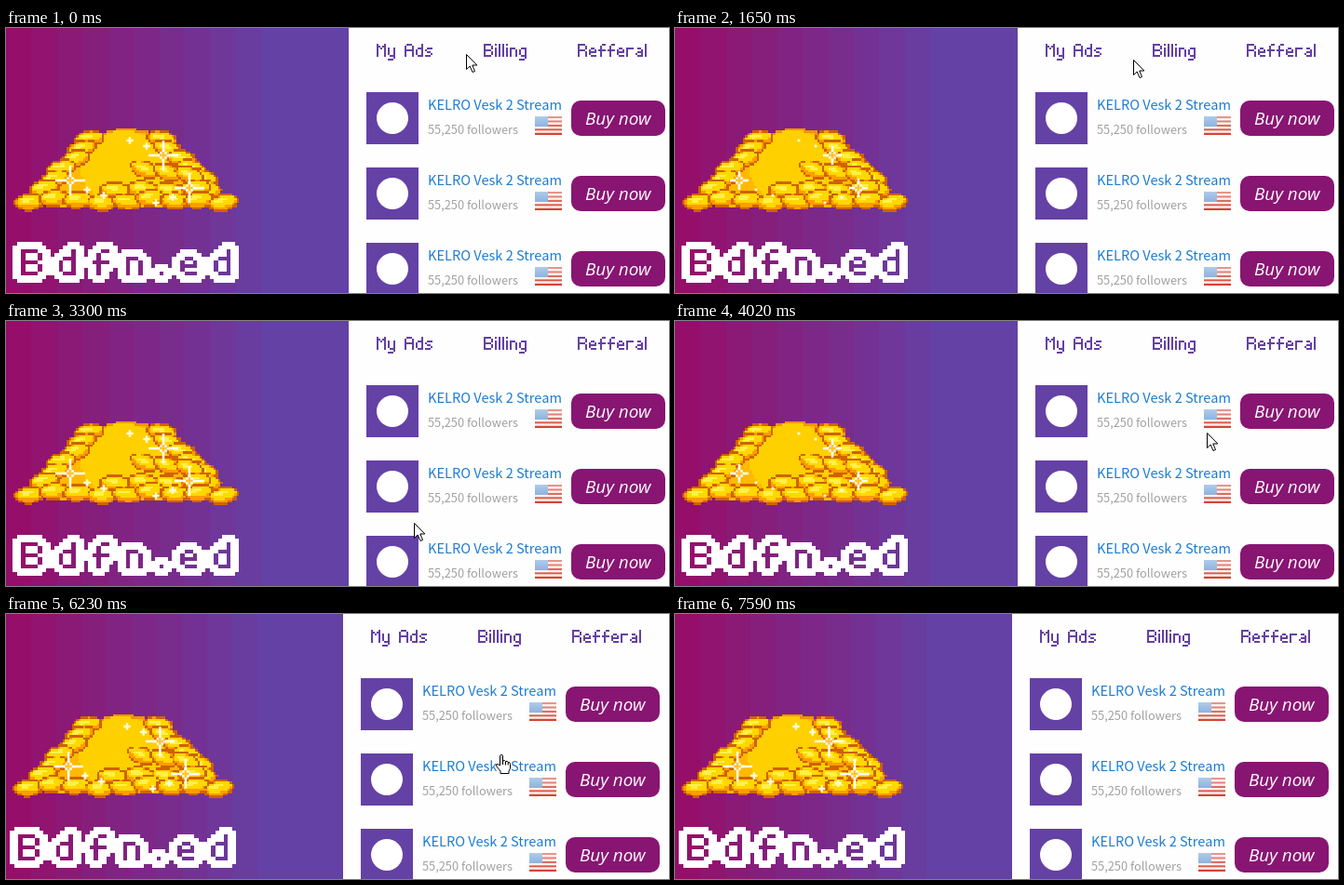
Write an HTML page with a canvas that moves like this. It is 712 px wide and 285 px high and loops after 7.69 s.

```html
<!DOCTYPE html>
<html lang="en">
<head>
<meta charset="utf-8">
<title>Stream ads</title>
<style>
  html, body { margin: 0; width: 100%; height: 100%; overflow: hidden; background: #fff; }
  canvas { display: block; }
</style>
</head>
<body>
<canvas id="stage" width="712" height="285" aria-label="Stream advertising page"></canvas>
<script>
const ctx = document.getElementById('stage').getContext('2d');
const LOOP = 7690, PURPLE = '#6441a5';
const SANS = '"Noto Sans CJK JP", "Noto Sans CJK SC", "Open Sans", sans-serif';

// Letters are built from shared strokes; each pair of digits is a column and a row.
const stem = '00 06', short = '02 06', bowl = '32 12 03 05 16 36';
const tail = '32 37 28 08', cap = '00 30 41 42 33 03';
const glyphs = {
  M: [stem, '00 22 40 46'],
  A: [stem.replace('00', '01'), '01 10 30 41 46', '03 43'],
  B: [stem, cap, '33 44 45 36 06'],
  R: [stem, cap, '33 44 46'],
  a: ['12 22 33 36 16 05 14 34'],
  d: ['30 36', bowl],
  e: ['34 04 05 16 36', '04 03 12 22 33 34'],
  f: ['16 11 20 30', '03 33'],
  g: [bowl, tail],
  i: ['00 00', short],
  l: [stem],
  n: [short, '03 12 22 33 36'],
  r: [short, '03 12 32'],
  s: ['32 12 03 14 24 35 26 06'],
  y: ['02 05 16 36', tail],
  '.': ['06 06']
};

function cellsOf(text, gap) {
  const cells = [];
  let left = 0;
  for (const ch of text) {
    if (ch === ' ') { left += 4; continue; }
    let width = 0;
    for (const stroke of glyphs[ch]) {
      const pts = stroke.split(' ').map(p => [+p[0], +p[1]]);
      for (let i = 1; i < pts.length; i++) {
        const [x, y] = pts[i - 1], dx = pts[i][0] - x, dy = pts[i][1] - y;
        const n = Math.max(Math.abs(dx), Math.abs(dy), 1);
        for (let k = 0; k <= n; k++) {
          const cx = Math.round(x + dx * k / n);
          cells.push([left + cx, Math.round(y + dy * k / n)]);
          width = Math.max(width, cx + 1);
        }
      }
    }
    left += width + gap;
  }
  return cells;
}

const nav = [['My Ads', 398], ['Billing', 513], ['Refferal', 614]]
  .map(([text, x]) => [cellsOf(text, 1), x]);
const logo = cellsOf('Bdfn.ed', 4);

let seed = 7;
const jitter = size => {
  seed = seed * 16807 % 2147483647;
  return (seed / 2147483647 * 2 - 1) * size;
};

// Gold pile, built once on a coarse grid.
const CELL = 2.5;
const pile = document.createElement('canvas');
pile.width = 102;
pile.height = 80;
const gold = pile.getContext('2d');

function disc(cx, cy, rx, ry, turn, color, floor = 198) {
  const c = Math.cos(turn), s = Math.sin(turn);
  gold.fillStyle = color;
  for (let j = 40; j < 80; j++) for (let i = 0; i < 102; i++) {
    const x = (i + .5) * CELL - cx, y = (j + .5) * CELL - cy;
    const u = (x * c + y * s) / rx, v = (y * c - x * s) / ry;
    if (u * u + v * v <= 1 && y + cy < floor) gold.fillRect(i, j, 1, 1);
  }
}

function coin(x, y, turn) {
  disc(x, y, 16.5, 9.5, turn, '#cf6200');
  disc(x, y, 14.5, 7.5, turn, '#ff9c00');
  disc(x, y - 1.5, 13.5, 5.5, turn, '#ffd800');
  disc(x - 3, y - 2.5, 7, 2, turn, '#fff04a');
}

disc(129, 193, 82, 85, 0, '#f09400', 193);
disc(129, 193, 79, 82, 0, '#ffb900', 193);
disc(126, 150, 46, 40, 0, '#ffd000', 193);
for (const side of [-1, 1]) {
  for (let i = 5; i >= 0; i--) {
    const k = i / 5;
    coin(129 + side * (90 - 55 * k) + jitter(5), 172 - 53 * k, side * .25 + jitter(.1));
  }
}
for (let i = 0; i < 3; i++) coin(149 + 24 * i, 152 + 3 * i, .35);
for (let i = 0; i < 4; i++) coin(117 + 29 * i, 172 + jitter(3), jitter(.2));
for (let i = 0; i < 9; i++) coin(25 + 26 * i, 185 + jitter(3), jitter(.2));

// Each star throws two small glints to one side.
const stars = [[69, 164, 1, 1], [169, 137, -1, -1], [197, 172, -1, 1]];

function drawSparkles(beat) {
  const k = beat % 17;
  const r = k < 8 ? 16 : 10 + 6 * Math.abs(Math.cos(Math.PI * (k - 7) / 10));
  const dot = (x, y, w = CELL, h = CELL) => ctx.fillRect(x - w / 2, y - h / 2, w, h);
  for (const [x, y, sx, sy] of stars) {
    ctx.fillStyle = '#fff';
    dot(x, y, CELL, 2 * r);
    dot(x, y, 2 * r, CELL);
    for (let i = -2; i <= 2; i++) for (let j = -2; j <= 2; j++) {
      const d = Math.abs(i) + Math.abs(j);
      ctx.fillStyle = d < 2 ? '#ffc020' : '#fff';
      if (d < 3) dot(x + i * CELL, y + j * CELL);
    }
    ctx.fillStyle = '#fffbd0';
    for (const n of [1, 2]) {
      const size = (k + n) % 17 > 11 ? CELL : 3 * CELL;
      dot(x + sx * 18 * n, y + sy * (4 + 6 * n), size);
      dot(x + sx * 18 * n, y + sy * (4 + 6 * n), CELL, size);
    }
  }
}

// Panel colour: equal purple bands with hard edges.
function bands(width) {
  const count = 11, g = ctx.createLinearGradient(0, 0, width * .82, 0);
  for (let i = 0; i < count; i++) {
    const mix = (a, b) => Math.round(a + (b - a) * i / (count - 1));
    const color = `rgb(${mix(149, 100)},${mix(15, 65)},${mix(106, 165)})`;
    g.addColorStop(i / count, color);
    g.addColorStop((i + 1) / count, color);
  }
  return g;
}

function drawLogo(x0, y0, fill) {
  const w = 4.5, h = 4;
  const block = (x, y, cw, ch) => {
    const l = Math.round(x0 + x * w), t = Math.round(y0 + y * h);
    ctx.fillRect(l, t, Math.round(x0 + (x + cw) * w) - l, Math.round(y0 + (y + ch) * h) - t);
  };
  ctx.fillStyle = '#fff';
  for (const [x, y] of logo) {
    block(x - 2, y - 1, 5, 3);
    block(x - 1, y - 2, 3, 5);
  }
  ctx.fillStyle = fill;
  for (const [x, y] of logo) block(x, y, 1, 1);
}

function drawPanel(beat, shifted) {
  const width = shifted ? 362 : 368, fill = bands(width);
  ctx.fillStyle = fill;
  ctx.fillRect(0, 0, width, 285);
  ctx.save();
  if (shifted) ctx.transform(.983, 0, 0, 1, -.7, 0);
  ctx.imageSmoothingEnabled = false;
  ctx.drawImage(pile, 0, 0, pile.width * CELL, pile.height * CELL);
  drawSparkles(beat);
  ctx.restore();
  drawLogo(shifted ? 13 : 16, shifted ? 237 : 238, fill);
}

function write(text, x, y, font, color) {
  ctx.font = font;
  ctx.fillStyle = color;
  ctx.fillText(text, x, y);
}

function drawFlag(x, y) {
  const stripes = 9, h = 20 / stripes;
  for (let i = 0; i < stripes; i++) {
    ctx.fillStyle = i % 2 ? '#f8ecea' : '#d4402f';
    ctx.fillRect(x, y + i * h, 29, h);
  }
  ctx.fillStyle = '#6d9fd6';
  ctx.fillRect(x, y, 14, 11);
  const gloss = ctx.createLinearGradient(0, y, 0, y + 20);
  gloss.addColorStop(0, '#fff7');
  gloss.addColorStop(1, '#fff0');
  ctx.fillStyle = gloss;
  ctx.fillRect(x, y, 29, 20);
}

function drawRow(y) {
  ctx.fillStyle = PURPLE;
  ctx.fillRect(387, y, 56, 56);
  ctx.fillStyle = '#fff';
  ctx.beginPath();
  ctx.arc(415, y + 28, 17, 0, 7);
  ctx.fill();
  write('KELRO Vesk 2 Stream', 453, y + 19, '14.6px ' + SANS, '#1c7cd3');
  write('55,250 followers', 453, y + 45, '12.8px ' + SANS, '#a0a0a0');
  drawFlag(568, y + 26);
  ctx.fillStyle = '#881572';
  ctx.beginPath();
  ctx.roundRect(607, y + 9, 101, 38, 10);
  ctx.fill();
  write('Buy now', 622, y + 35, 'italic 500 18.9px "Open Sans", "Noto Sans", sans-serif', '#fff');
}

const rows = [69, 150, 231];

function drawList(shifted) {
  ctx.save();
  if (shifted) ctx.translate(-6, 0);
  ctx.fillStyle = PURPLE;
  for (const [cells, x] of nav)
    for (const [cx, cy] of cells) ctx.fillRect(x + cx * 2, 17 + cy * 2, 2, 2);
  rows.forEach(drawRow);
  ctx.restore();
}

// Pointer stops: beat, x, y.
const track = [
  [0, 494, 28], [6, 642, 83], [8, 662, 96], [13, 450, 18], [17, 191, 118], [20, 155, 264],
  [24, 438, 217], [30, 597, 100], [37, 437, 27], [38, 450, 45], [42, 532, 151], [46, 615, 290]
];

function pointerAt(beat) {
  const i = track.findIndex(p => p[0] > beat);
  if (i < 0) return null;
  const [b0, x0, y0] = track[i - 1], [b1, x1, y1] = track[i];
  const k = (beat - b0) / (b1 - b0);
  return [Math.round(x0 + (x1 - x0) * k), Math.round(y0 + (y1 - y0) * k)];
}

function overLink(x, y, shifted) {
  if (shifted) x += 6;
  return x < 368 || rows.some(top =>
    x > 453 && x < 597 && y > top && y < top + 24 ||
    x > 607 && x < 708 && y > top + 9 && y < top + 47);
}

const arrow = new Path2D('M.5 .5V16.5L4.2 13L7 19.5L9.5 18.5L6.8 12H11.8Z');
const hand = new Path2D('M-1.5 12V1.5Q-1.5 .5 0 .5Q1.5 .5 1.5 1.5V7Q4 5.8 4.5 7.5Q7 6.8 7.2 8.5Q9.5 8 9.5 10.5V15L8 18V20.5H-1V18L-5.5 12.5Q-6 10 -3.8 10.5Z');
const fingers = new Path2D('M1.5 7V11M4.5 7.5V11.5M7.2 8.5V11.5');

function drawPointer(x, y, link) {
  const shape = link ? hand : arrow;
  ctx.save();
  ctx.translate(x, y);
  ctx.fillStyle = '#fff';
  ctx.strokeStyle = '#000';
  ctx.fill(shape);
  ctx.stroke(shape);
  if (link) ctx.stroke(fingers);
  ctx.restore();
}

// The picture moves in even beats, with a rest before the layout shifts.
const STEP = 134.7, FIRST = 160, SHIFT = 5690, REST = 37;

function beatAt(t) {
  if (t < FIRST) return 0;
  if (t < SHIFT) return Math.min(REST, 1 + Math.floor((t - FIRST) / STEP));
  return REST + 1 + Math.floor((t - SHIFT) / STEP);
}

function draw(t) {
  const beat = beatAt(t), shifted = beat > REST;
  ctx.fillStyle = '#fefefe';
  ctx.fillRect(0, 0, 712, 285);
  drawPanel(beat, shifted);
  drawList(shifted);
  const p = pointerAt(beat);
  if (p) drawPointer(...p, overLink(...p, shifted));
}

const start = performance.now();
function tick() {
  draw((performance.now() - start) % LOOP);
  requestAnimationFrame(tick);
}
tick();
</script>
</body>
</html>
```
